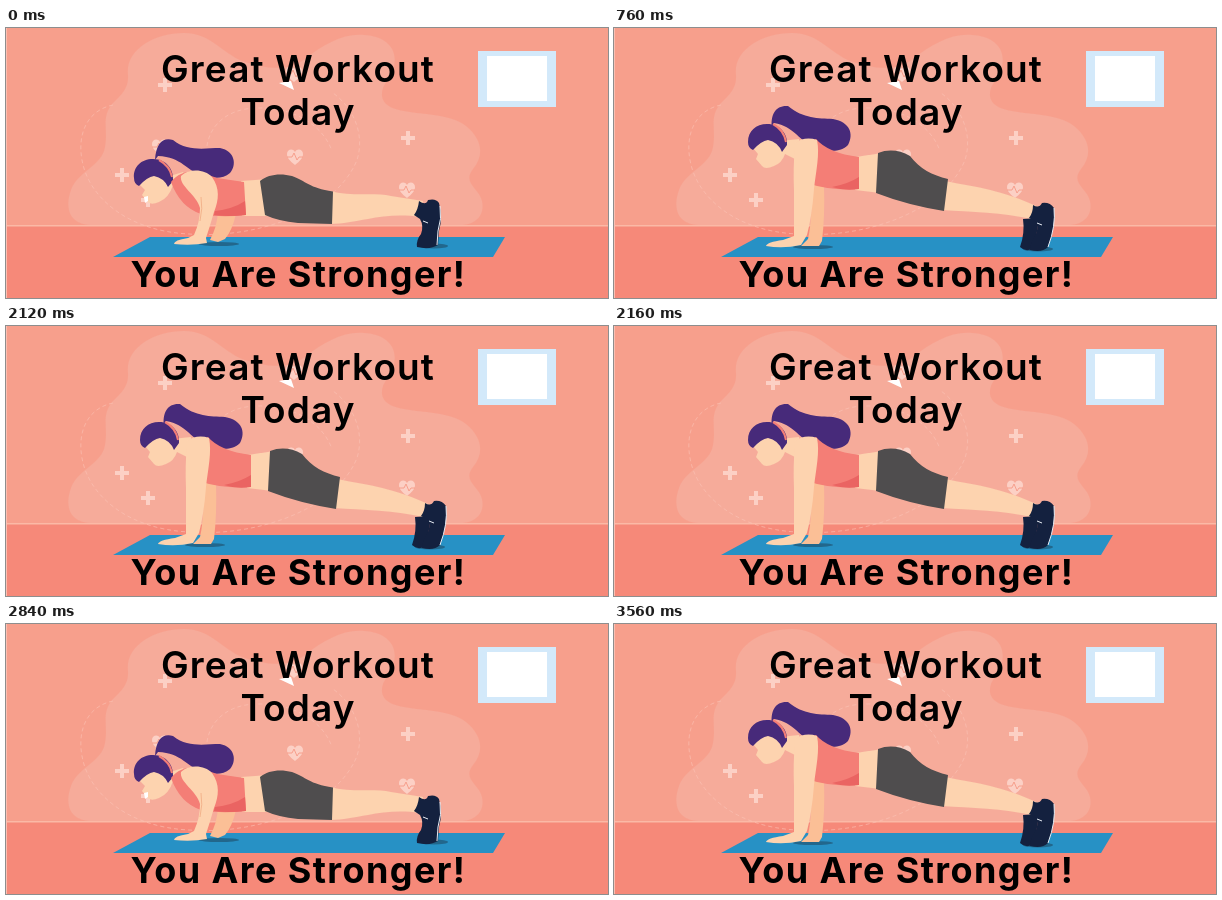
An HTML page for the animation above (4.04 s loop, 602 by 270 pixels).

```html
<!DOCTYPE html>
<html lang="en">
<head>
<meta charset="utf-8">
<title>Great Workout Today</title>
<style>
html, body { margin: 0; width: 100%; height: 100%; overflow: hidden; background: #f79f8c; }
svg { display: block; width: 100vw; height: 100vh; }
text { font-family: Inter, "Open Sans", sans-serif; text-anchor: middle; }
.title { font-size: 37px; font-weight: 600; letter-spacing: 1.1px; }
.cheer { font-size: 36px; font-weight: 700; letter-spacing: 1.4px; }
.hair { fill: #472a7a; }
.skin { fill: #fdd3af; }
.shade { fill: #fbbf96; }
.top { fill: #f47e76; }
.dark { fill: #ea6462; }
.shorts { fill: #4f4d4e; }
.shoe { fill: #14213f; }
.shadow { fill: #22678c; }
.sole { fill: none; stroke: #e8edf5; stroke-width: 1; }
.band { fill: none; stroke: #f47e76; stroke-width: 2; }
.fold { fill: none; stroke: #f0ab83; stroke-width: .8; }
</style>
</head>
<body>
<svg viewBox="0 0 602 270">
  <defs>
    <path id="plus" d="M-2-7h4v5h5v4h-5v5h-4v-5h-5v-4h5z"/>
    <g id="heart">
      <path d="M0 8C-5 4-8 1-8-3C-8-8-2-9 0-5C2-9 8-8 8-3C8 1 5 4 0 8Z"/>
      <path d="M-8 0h5l2-4 3 7 2-3h4" fill="none" stroke="#f79f8c"/>
    </g>
  </defs>

  <path fill="#f68979" d="M0 198h602v72H0z"/>
  <path fill="#fbb9a6" d="M0 197h602v1.6H0z"/>
  <path fill="#fabfb2" d="M0 0h1v270H0z"/>
  <path fill="#f6ab9a" d="M84 197C62 196 59 178 65 162C72 143 96 138 99 119C102 103 96 91 104 79C111 69 123 64 122 47C119 22 148 5 178 5C207 5 217 28 242 35C264 41 282 43 299 31C318 16 338 5 358 7C380 8 392 21 388 38C385 51 375 56 376 68C379 92 437 79 460 98C477 112 478 128 467 141C456 155 473 160 476 173C479 187 470 197 454 197Z"/>
  <g fill="none" stroke="#fbc3b6" stroke-dasharray="4 3" opacity=".6">
    <path d="M107 77C82 82 71 105 76 132C82 168 120 203 183 206C250 211 330 184 351 132C359 107 348 80 327 65"/>
    <path d="M201 132C197 103 217 80 252 80C287 79 317 97 326 123"/>
  </g>
  <g fill="#fcd0c5">
    <use href="#plus" x="159" y="57"/>
    <use href="#plus" x="402" y="110"/>
    <use href="#plus" x="116" y="147"/>
    <use href="#plus" x="142" y="172"/>
    <use href="#heart" x="154" y="119"/>
    <use href="#heart" x="289" y="129"/>
    <use href="#heart" x="401" y="162"/>
    <use href="#heart" x="288" y="46"/>
  </g>
  <path fill="#fff" d="M273 55l12-2 3 9z"/>
  <path fill="#d3e9fa" d="M472 23h78v56h-78z"/>
  <path fill="#fff" d="M481 28h60v45h-60z"/>
  <path fill="#2791c5" d="M144 209h355l-12 20H107z"/>

  <g id="down">
    <ellipse class="shadow" cx="213" cy="216" rx="20" ry="2"/>
    <ellipse class="shadow" cx="428" cy="218" rx="14" ry="2.5"/>
    <path class="shade" d="M212 184L230 186Q226 203 219 211L212 214L204 212Q211 199 212 184Z"/>
    <path class="hair" d="M149 132C150 115 157 109 167 112C182 124 199 120 214 120C229 123 231 137 224 145C216 152 205 150 195 147C181 143 176 129 152 128Z"/>
    <path class="skin" d="M161 149L177 144L184 163L167 157Q163 170 153 174Q144 178 141 173L136 167L139 162L133 156L150 143Z"/>
    <path fill="#fff" d="M138 169l4-1v5l-3 2z"/>
    <path class="hair" d="M128 150C127 139 135 131 147 131C161 131 168 142 167 153L162 159Q158 150 148 148Q141 149 133 158Q128 156 128 150Z"/>
    <path class="band" d="M153 132Q164 138 166 149"/>
    <path class="skin" d="M235 153L262 151L263 188L236 188Z"/>
    <path class="top" d="M165 154Q173 143 191 143L211 150L238 154L240 187Q214 190 195 186Q174 179 165 154Z"/>
    <path class="dark" d="M209 183Q227 181 239 173L240 187Q222 189 208 187Z"/>
    <path class="skin" d="M175 148C183 140 199 141 206 149C214 160 213 172 208 184Q204 198 200 210L201 215Q185 218 168 216Q168 212 182 210L188 207Q194 194 194 180C191 167 173 158 175 148Z"/>
    <path class="fold" d="M195 169Q197 180 194 193"/>
    <path class="skin" d="M324 163C345 169 369 164 385 168L417 173L414 189C395 186 377 188 362 191C348 193 337 196 324 196Z"/>
    <path class="shorts" d="M254 153C262 146 275 145 286 148C300 153 303 160 327 163.5L326 196L292 195Q272 193 259 187Z"/>
    <path class="shoe" d="M413 173Q420 178 422 172Q430 170 433 175Q437 190 433 203L432 217Q424 222 411 219Q410 212 415 206Q418 198 414 191L408 187Q412 182 413 173Z"/>
    <path class="sole" d="M434 178Q436 191 432 203L431 217M417 193l5 2"/>
  </g>

  <g id="up">
    <ellipse class="shadow" cx="199" cy="219" rx="20" ry="2"/>
    <ellipse class="shadow" cx="424" cy="221" rx="15" ry="2.5"/>
    <path class="shade" d="M197 151L210 158Q211 188 208 213L205 218L187 218L194 211Q199 189 197 151Z"/>
    <path class="hair" d="M158 101C156 86 162 77 174 78C190 91 204 90 219 91C236 94 240 106 234 117C224 127 208 122 197 117C183 111 181 99 160 95Z"/>
    <path class="skin" d="M166 113L185 111L185 133L171 126Q168 135 160 138Q151 142 148 138L142 131L144 126L139 120L155 108Z"/>
    <path class="hair" d="M134 114C134 103 142 96 153 96C166 96 174 106 173 117L168 124Q164 114 154 112Q147 113 139 122Q134 120 134 114Z"/>
    <path class="band" d="M159 96Q170 102 172 114"/>
    <path class="skin" d="M242 129L268 125L266 165L241 162Z"/>
    <path class="top" d="M193 115L202 111Q214 125 245 129L245 161Q217 163 196 156Z"/>
    <path class="dark" d="M218 159Q234 156 245 149V161Q230 163 218 159Z"/>
    <path class="skin" d="M181 115Q191 108 203 112C206 126 202 143 200 161Q198 188 193 207L187 217Q169 221 152 218Q153 214 169 212L180 208Q180 186 180 163Q179 140 181 115Z"/>
    <path class="skin" d="M331 153C366 160 385 161 427 180L421 192C387 184 358 184 328 182Z"/>
    <path class="shorts" d="M264 125Q280 119 296 128C306 141 318 147 334 151L330 183Q293 177 262 165Z"/>
    <path class="shoe" d="M409 191L424 190Q424 208 418 221Q411 224 406 219Q411 205 409 191Z"/>
    <path class="shoe" d="M419 177Q425 181 428 175Q436 174 440 180Q442 198 434 219Q428 225 416 222Q417 213 422 206Q425 198 421 193L415 190Q419 185 419 177Z"/>
    <path class="sole" d="M440 180Q442 198 434 219M423 195l5 2"/>
  </g>

  <text class="title" x="292" y="53.5">Great Workout</text>
  <text class="title" x="292" y="96.5">Today</text>
  <text class="cheer" x="292.5" y="258.5">You Are Stronger!</text>
</svg>
<script>
const LOOP = 4040, REP = 1400, LOW = 720;
const down = document.getElementById("down");
const up = document.getElementById("up");
const start = performance.now();

function draw(now) {
  const t = Math.max(0, now - start) % LOOP;
  const low = t % REP < LOW;
  down.style.display = low ? "" : "none";
  up.style.display = low ? "none" : "";
  requestAnimationFrame(draw);
}
draw(start);
</script>
</body>
</html>
```
